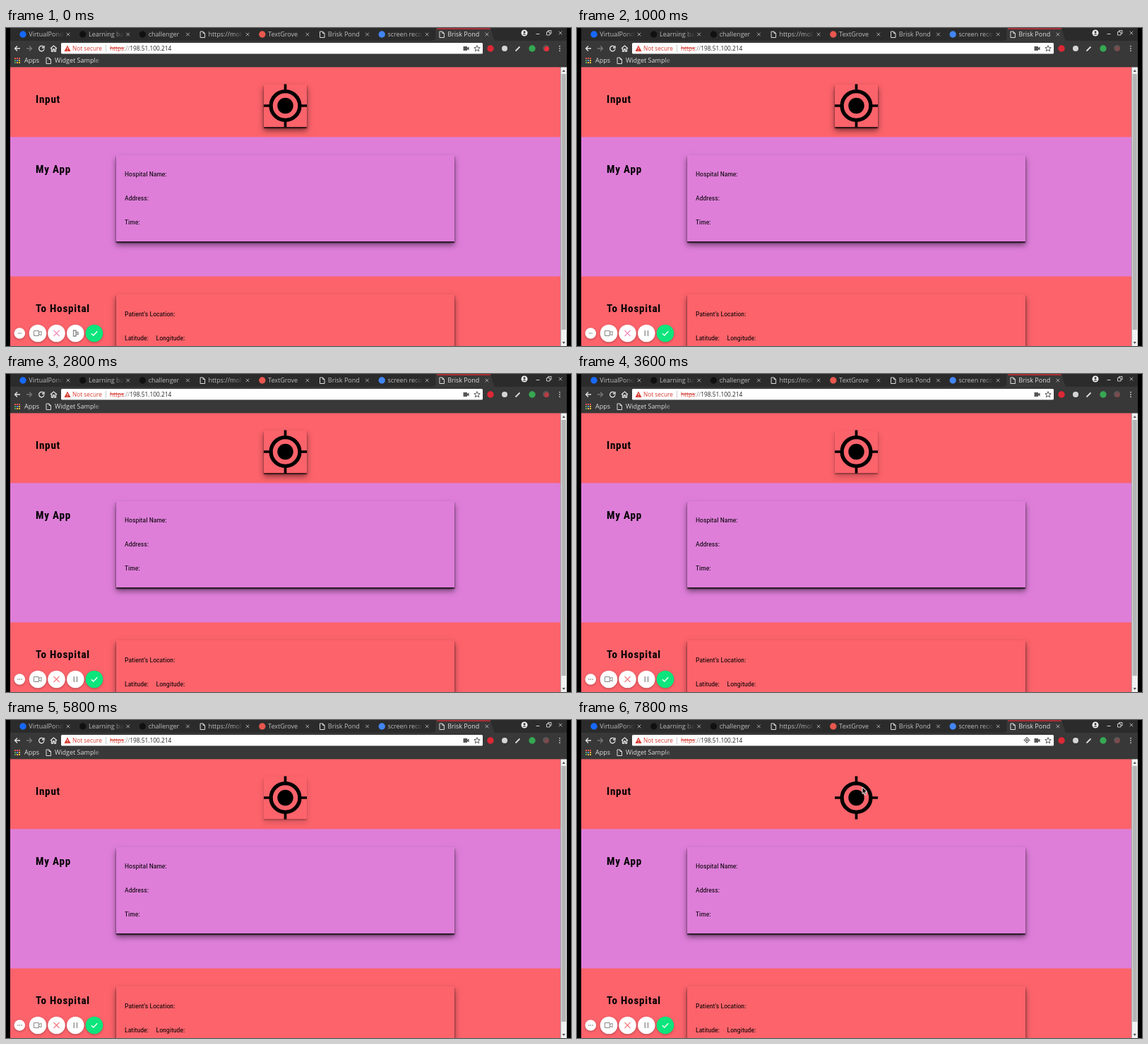
An HTML page for the animation above (8 s loop, 800x450 px).

```html
<!DOCTYPE html>
<html lang="en">
<head>
<meta charset="utf-8">
<title>Locator page</title>
<style>
html, body { margin: 0; width: 100%; height: 100%; overflow: hidden; background: #000; }
#stage { position: relative; width: 800px; height: 450px; overflow: hidden; }
#stage > * { position: absolute; }
svg { inset: 0; font: 9px "Open Sans", "Noto Sans", sans-serif; }
#bands {
  left: 6px; top: 55px; width: 779px; height: 395px;
  background: linear-gradient(#fc636b 98.8px, #de7ed9 99.8px 296px, #fc636b 297px);
}
.card {
  --lift: 1;
  box-shadow: 0 2px 1.5px rgb(0 0 0 / calc(.75 * var(--lift))),
              0 5px 8px rgb(0 0 0 / calc(.5 * var(--lift)));
}
.panel { left: 156px; width: 479px; height: 122px; background: #de7ed9; }
.panel.red { background: #fc636b; }
#locate { left: 365px; top: 80px; width: 61px; height: 60px; background: #fc636b; }
.page { font: 9.8px "Roboto Condensed", Roboto, sans-serif; font-stretch: 75%; }
.head { font-size: 15.1px; font-weight: 700; letter-spacing: .8px; }
.line { fill: none; stroke-width: 1.3; }
.round { fill: #fff; filter: drop-shadow(0 1px 1.5px rgb(0 0 0 / .3)); }
</style>
</head>
<body>
<div id="stage">
  <div id="bands"></div>
  <div id="locate" class="card"></div>
  <div class="card panel" style="top:180px"></div>
  <div class="card panel red" style="top:377px"></div>

  <svg width="800" height="450" viewBox="0 0 800 450">
    <defs>
      <linearGradient id="fade"><stop stop-color="#2b2b2b" stop-opacity="0"/><stop offset="1" stop-color="#2b2b2b"/></linearGradient>
      <linearGradient id="barFade"><stop stop-color="#383838" stop-opacity="0"/><stop offset="1" stop-color="#383838"/></linearGradient>
      <path id="sheet" d="M-3-4H1L3.5-1.5V4.5H-3ZM1-4V-1.5H3.5" fill="none" stroke="#ddd"/>
      <path id="cross" d="M-2.3-2.3L2.3 2.3M2.3-2.3L-2.3 2.3" fill="none" stroke="#aaa"/>
    </defs>

    <!-- tab strip and toolbar -->
    <rect x="6" width="788" height="19" fill="#2b2b2b"/>
    <rect x="6" y="18" width="788" height="37.400" fill="#383838"/>
    <path d="M604 19L609 0H686L692 19Z" fill="#383838"/>
    <rect x="610" y=".4" width="76" height="1.400" fill="#d42a31"/>
    <g id="tabs"></g>
    <g class="line" style="stroke-width:1" stroke="#ccc">
      <path d="M750.500 8.500H755.500M765.500 5.500H770V10H765.500ZM767.500 5V3.500H772V8H770"/>
      <use href="#cross" x="785" y="7"/>
    </g>
    <circle cx="734" cy="7" r="4.500" fill="#eee"/>
    <circle cx="734" cy="5.700" r="1.500" fill="#333"/>
    <path d="M731.300 9.500Q734 6.500 736.700 9.500Z" fill="#333"/>

    <g class="line" stroke="#e4e4e4">
      <path d="M20 29H12.500M16 25.500L12.500 29L16 32.500"/>
      <path d="M29 29H36.500M33 25.500L36.500 29L33 32.500" stroke="#777"/>
      <path d="M53 26.500A3.700 3.700 0 1 0 54 29.500M54 25V28H51"/>
      <path d="M63 29L67.500 25L72 29M64.500 28.500V33H66.500V30H68.500V33H70.500V28.500"/>
    </g>
    <rect x="78" y="21" width="597" height="15.500" rx="1.500" fill="#fff"/>
    <path d="M87 24.500L91.500 33H82.500Z" fill="#d8382e"/>
    <path d="M87 27.500V30M87 31V32" stroke="#fff"/>
    <g font-size="8.300">
      <text x="94" y="31.500" fill="#d8382e">Not secure</text>
      <path d="M141.500 24V34" stroke="#ccc"/>
      <text x="147" y="31.500" fill="#222"><tspan fill="#d8382e" text-decoration="line-through">https</tspan><tspan fill="#888">://</tspan>198.51.100.214</text>
    </g>
    <g id="pin" class="line" style="stroke-width:1" stroke="#555">
      <circle cx="637" cy="28.500" r="3"/>
      <circle cx="637" cy="28.500" r="1" fill="#555"/>
      <path d="M637 24V26M637 31V33M632.500 28.500H634.500M639.500 28.500H641.500"/>
    </g>
    <path d="M647.500 26H653V28L655.500 26.500V31.500L653 30V32H647.500Z" fill="#555"/>
    <path d="M667 24.700L668.200 27.600L671.200 27.800L668.900 29.800L669.700 32.800L667 31.100L664.300 32.800L665.100 29.800L662.800 27.800L665.800 27.600Z" class="line" style="stroke-width:1" stroke="#555"/>
    <circle cx="686" cy="29" r="4.700" fill="#dc2834"/>
    <circle cx="706" cy="29" r="4" fill="#d5d5d5"/>
    <path d="M721.500 32.500L727.500 26.500" stroke="#ddd" stroke-width="1.800"/>
    <circle cx="745" cy="29" r="4.700" fill="#36a852"/>
    <circle cx="764.500" cy="28.500" r="4.500" fill="#555"/>
    <circle id="record" cx="765.500" cy="29.500" r="3.500" fill="#f02f3b"/>
    <path d="M784 25V26.500M784 28.300V29.800M784 31.600V33.100" stroke="#ddd" stroke-width="1.500"/>

    <g id="apps"></g>
    <text x="26" y="49.300" fill="#ddd">Apps</text>
    <use href="#sheet" x="60" y="46"/>
    <text x="69" y="49.300" fill="#ddd">Widget Sample</text>
    <rect x="124" y="39" width="13" height="14" fill="url(#barFade)"/>
    <rect x="137" y="39" width="12" height="14" fill="#383838"/>

    <!-- page -->
    <rect x="785.300" y="55.400" width="8.700" height="395" fill="#f1f1f1"/>
    <rect x="786.500" y="65" width="6.500" height="362" fill="#b5b5b5"/>
    <path d="M787.500 62L789.700 59L792 62ZM787.500 444L789.700 447L792 444Z" fill="#555"/>
    <g class="page">
      <g class="head">
        <text x="42" y="105.900">Input</text>
        <text x="42" y="204.900">My App</text>
        <text x="42" y="401.900">To Hospital</text>
      </g>
      <text x="168" y="210.300">Hospital Name:</text>
      <text x="168" y="244.300">Address:</text>
      <text x="168" y="278.300">Time:</text>
      <text x="168" y="407.800">Patient's Location:</text>
      <text x="168" y="441.800">Latitude:</text>
      <text x="212.500" y="441.800">Longitude:</text>
    </g>
    <g transform="translate(395.500 110)" stroke="#000">
      <circle r="20.400" fill="none" stroke-width="5.300"/>
      <circle r="11.200" stroke="none"/>
      <path d="M0-30.500V-22M0 22V30.500M-30.500 0H-22M22 0H30.500" stroke-width="3.700"/>
    </g>

    <!-- recorder controls -->
    <circle class="round" cx="19.300" cy="432" r="7.800"/>
    <path id="minus" d="M16.300 432H22.300" stroke="#999"/>
    <path id="dots" d="M16 432H23" stroke="#888" stroke-width="1.500" stroke-dasharray="1.400 1.300"/>
    <circle class="round" cx="45" cy="432" r="12.300"/>
    <circle class="round" cx="71.500" cy="432" r="12.300"/>
    <circle class="round" cx="98.300" cy="432" r="12.300"/>
    <circle class="round" cx="125" cy="432" r="12.300" style="fill:#0ce57c"/>
    <g class="line" stroke="#888">
      <path d="M39.500 428.500H46.500V435.500H39.500ZM46.500 431L50 429V435L46.500 433" style="stroke-width:1"/>
      <path id="cancel" d="M67.500 428L75.500 436M75.500 428L67.500 436"/>
      <path id="pause" d="M96.300 428V436M100.500 428V436"/>
      <path id="resume" d="M95.500 428H99V436H95.500ZM99 430.500H102V433.500H99"/>
      <path d="M120.800 432.300L123.800 435L129.300 429.200" stroke="#fff"/>
    </g>

    <path id="cursor" d="M0 0V9.500L2.300 7.500L4 11L5.700 10.200L4 6.800H7Z" fill="#111" stroke="#fff" stroke-width=".9"/>
  </svg>
</div>

<script>
const LOOP = 8000, STEP = 200;
const $ = id => document.getElementById(id);

// Title and favicon: a colour for a plain mark, or none for a page sheet.
const tabs = [
  ["VirtualPond", "#1769ff"], ["Learning bas", "#111"], ["challenger", "#111"], ["https://mol"],
  ["TextGrove", "#e8574e"], ["Brisk Pond"], ["screen reco", "#4285f4"], ["Brisk Pond"]
];
$("tabs").innerHTML = tabs.map(([title, color], i) => {
  const x = 24 + i * 84.7, active = i === tabs.length - 1;
  const icon = color ? `<circle cx="${x}" cy="9" r="4.700" fill="${color}"/>`
    : `<use href="#sheet" x="${x}" y="9"/>`;
  const fade = active || title.length < 11 ? "" :
    `<rect x="${x + 43}" y="3" width="15" height="14" fill="url(#fade)"/>
     <rect x="${x + 58}" y="3" width="18" height="14" fill="#2b2b2b"/>`;
  return `${icon}<text x="${x + 8.3}" y="12.300" fill="${active ? "#e0e0e0" : "#bdbdbd"}">${title}</text>
    ${fade}<use href="#cross" x="${x + 64}" y="9"/>`;
}).join("");

const appColors = ["#e8574e", "#e8574e", "#e8574e", "#58a65c", "#4d8df5", "#f2bd42", "#58a65c", "#f2bd42", "#f2bd42"];
$("apps").innerHTML = appColors.map((color, i) =>
  `<rect x="${12 + i % 3 * 3}" y="${42 + Math.floor(i / 3) * 3}" width="2" height="2" fill="${color}"/>`).join("");

// Linear interpolation through [time, value] points.
function track(points, t) {
  const next = points.findIndex(p => p[0] > t);
  if (next < 0) return points.at(-1)[1];
  if (next === 0) return points[0][1];
  const [t0, a] = points[next - 1], [t1, b] = points[next];
  return a + (b - a) * (t - t0) / (t1 - t0);
}
const lift = [[0, 1], [2600, 1], [3600, .4], [4000, 0], [4200, 0], [5000, .9], [5200, .9], [5800, .3], [6400, 0]];
const cursorX = [[7200, 397], [7400, 402], [7600, 404]];
const cursorY = [[7200, 111], [7400, 98], [7600, 95]];

const show = (id, on) => $(id).setAttribute("visibility", on ? "visible" : "hidden");

function draw(now) {
  const t = Math.floor(now % LOOP / STEP) * STEP;
  $("locate").style.setProperty("--lift", track(lift, t));
  $("record").setAttribute("opacity", .25 + .75 * Math.max(0, Math.cos(t / 2400 * 2 * Math.PI)));
  $("cancel").setAttribute("stroke", t < 2600 ? "#f58fc0" : "#f77f86");
  show("resume", t < 400);
  show("pause", t >= 400);
  show("minus", t < 2600);
  show("dots", t >= 2600);
  show("pin", t >= 7600);
  show("cursor", t >= 7200);
  $("cursor").setAttribute("transform", `translate(${track(cursorX, t)} ${track(cursorY, t)})`);
}

const start = performance.now();
function tick() {
  draw(performance.now() - start);
  requestAnimationFrame(tick);
}
tick();
</script>
</body>
</html>
```
